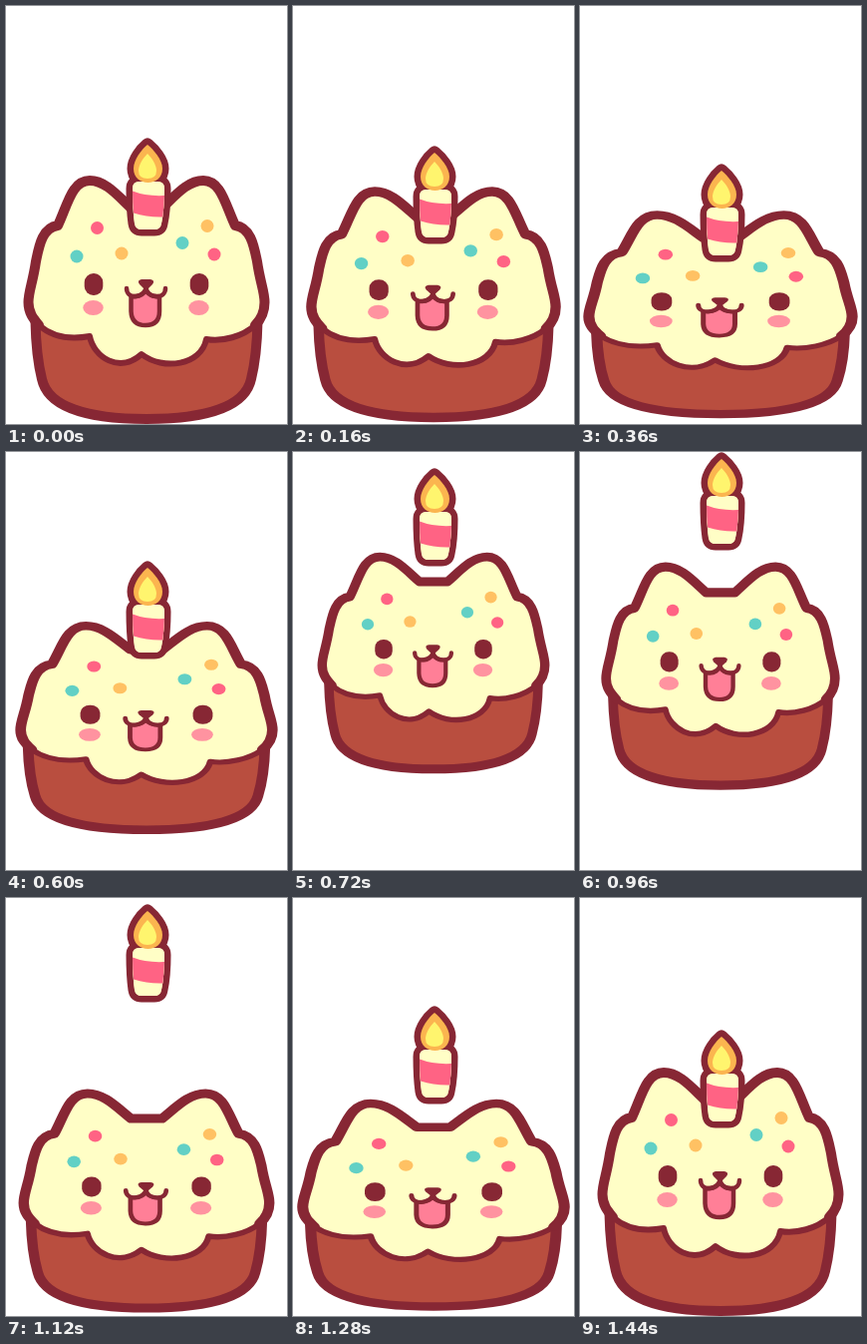
Write an HTML page that moves like this. It is 282 px wide and 419 px high and loops after 1.48 s.

```html
<!DOCTYPE html>
<html lang="en">
<head>
<meta charset="utf-8">
<title>Birthday cupcake cat</title>
<style>
  html, body { margin: 0; width: 100%; height: 100%; overflow: hidden; background: #fff; }
  svg { display: block; width: 100vw; height: 100vh; }
  .line { stroke: #872734; stroke-linejoin: round; stroke-linecap: round; }
  .dark { fill: #872734; }
  .cream { fill: #fffec6; }
  .pink { fill: #ff6384; }
  .blush { fill: #ff93a0; }
  .teal { fill: #62d0c5; }
  .orange { fill: #ffc163; }
</style>
</head>
<body>
<svg viewBox="0 0 282 419">
  <g id="cake">
    <path class="line" fill="#b94e3f" stroke-width="10"
      d="M29.500 316C30 340 32 358 36 374C42 402 82 414 141 414S240 402 246 374C250 358 252 340 252.500 316Z"/>
    <path id="frosting" class="line cream" stroke-width="6"/>
    <path id="rim" class="line" fill="none" stroke-width="10"/>
    <g id="sprinkles"></g>
    <g class="dark">
      <rect x="78.700" y="268" width="18.600" height="22" rx="9"/>
      <rect x="184.700" y="268" width="18.600" height="22" rx="9"/>
      <path d="M136 274H145Q150 275 147 279L143 283Q140.500 285 138 283L134 279Q131 275 136 274Z"/>
    </g>
    <g class="blush">
      <ellipse cx="87.500" cy="302.500" rx="10.200" ry="7.500"/>
      <ellipse cx="193.500" cy="302.500" rx="10.200" ry="7.500"/>
    </g>
    <g class="line" stroke-width="4.500">
      <path fill="#ff7f97" d="M125.500 291V306Q126 320 140 320T154 306V291Q145 292 140 285Q135 292 125.500 291Z"/>
      <path fill="none" d="M121 283C121 294 138 294 140.500 283C143 294 160 294 160 283"/>
    </g>
  </g>
  <g id="candle">
    <g class="line dark" stroke-width="13">
      <path id="wax" d="M127 51Q127 44 134 44H152Q159 44 159 51Q159 72 156 86Q155 92 149 92H136Q130 92 129 86Q127 72 127 51Z"/>
      <path id="flame" d="M142 7C148 12 157 22 157 31C157 40 150 45 142.500 45S128 40 128 31C128 22 136 12 142 7Z"/>
    </g>
    <use href="#wax" class="cream" style="fill:#fffec6"/>
    <path id="waxFill" class="cream"/>
    <path class="pink" d="M127 53.500Q141 59 159 58Q158.500 70 157.300 79.500Q142 80 128 75.500Q127 66 127 53.500Z"/>
    <path id="flameFill" fill="#fbb54f"/>
    <path fill="#fff56e" d="M142 16C146 20 151 27 151 33Q151 41 142 41T133 33C133 27 138 20 142 16Z"/>
  </g>
</svg>
<script>
const $ = id => document.getElementById(id);
const LOOP = 1480, STEP = 40, CENTER = 141, GROUND = 384;

const rim = 'C255 315 259.5 308 259.5 297C259.5 286 255 277 252 256C249 242 246 222 230 220' +
  'C220 199 216 175 198 175C182 175 170 190 156 203H126C112 190 100 175 84 175' +
  'C66 175 62 199 52 220C36 222 33 242 30 256C27 277 22.5 286 22.5 297C22.5 308 28 314 33 320';
const scallops = 'C48 333 68 334 84 331C88 352 114 369 136 349C158 366 196 360 201 334C217 337 238 331 250 320Z';
$('rim').setAttribute('d', 'M250 320' + rim);
$('frosting').setAttribute('d', 'M250 320' + rim + scallops);
$('waxFill').setAttribute('d', $('wax').getAttribute('d'));
$('flameFill').setAttribute('d', $('flame').getAttribute('d'));

$('sprinkles').innerHTML = [
  ['pink', 91.5, 222.5], ['teal', 71, 251], ['orange', 116, 248],
  ['teal', 177, 237.5], ['orange', 202, 220.5], ['pink', 209, 249]
].map(([color, x, y]) => `<circle class="${color}" cx="${x}" cy="${y}" r="6.5"/>`).join('');

// Smooth monotone curve through [time, value] keys.
function curve(keys) {
  const rate = i => (keys[i + 1][1] - keys[i][1]) / (keys[i + 1][0] - keys[i][0]);
  const slopes = keys.map((_, i) => {
    if (!i || i === keys.length - 1) return 0;
    const a = rate(i - 1), b = rate(i);
    return a * b > 0 ? 2 * a * b / (a + b) : 0;
  });
  return t => {
    let i = 0;
    while (i < keys.length - 2 && t >= keys[i + 1][0]) i++;
    const [t0, v0] = keys[i], [t1, v1] = keys[i + 1];
    const h = t1 - t0, u = Math.min(1, (t - t0) / h), w = 1 - u;
    return w * w * ((1 + 2 * u) * v0 + u * h * slopes[i]) +
           u * u * ((1 + 2 * w) * v1 - w * h * slopes[i + 1]);
  };
}

const scaleX = curve([[0, 1], [360, 1.115], [460, 1.15], [560, 1.112], [600, 1.066],
  [720, .943], [780, .935], [960, .969], [1120, 1.04], [1240, 1.12], [1440, 1]]);
const scaleY = curve([[0, 1], [360, .835], [460, .8], [560, .825], [600, .855],
  [720, .89], [840, .92], [960, .916], [1120, .9], [1240, .835], [1440, 1]]);
const candleY = curve([[0, 132], [360, 158], [460, 165], [560, 145], [600, 109],
  [720, 16], [820, 3], [960, 0], [1120, 6], [1200, 38], [1280, 108], [1330, 150], [1440, 132]]);

function jump(t) {
  const u = (t - 560) / 520;
  return u > 0 && u < 1 ? -436 * u * (1 - u) : 0;
}

function draw(now) {
  const t = Math.floor(now % LOOP / STEP) * STEP;
  $('cake').setAttribute('transform',
    `translate(${CENTER} ${GROUND + jump(t)}) scale(${scaleX(t)} ${scaleY(t)}) translate(${-CENTER} ${-GROUND})`);
  $('candle').setAttribute('transform', `translate(0 ${candleY(t)})`);
  requestAnimationFrame(draw);
}
draw(performance.now());
</script>
</body>
</html>
```
